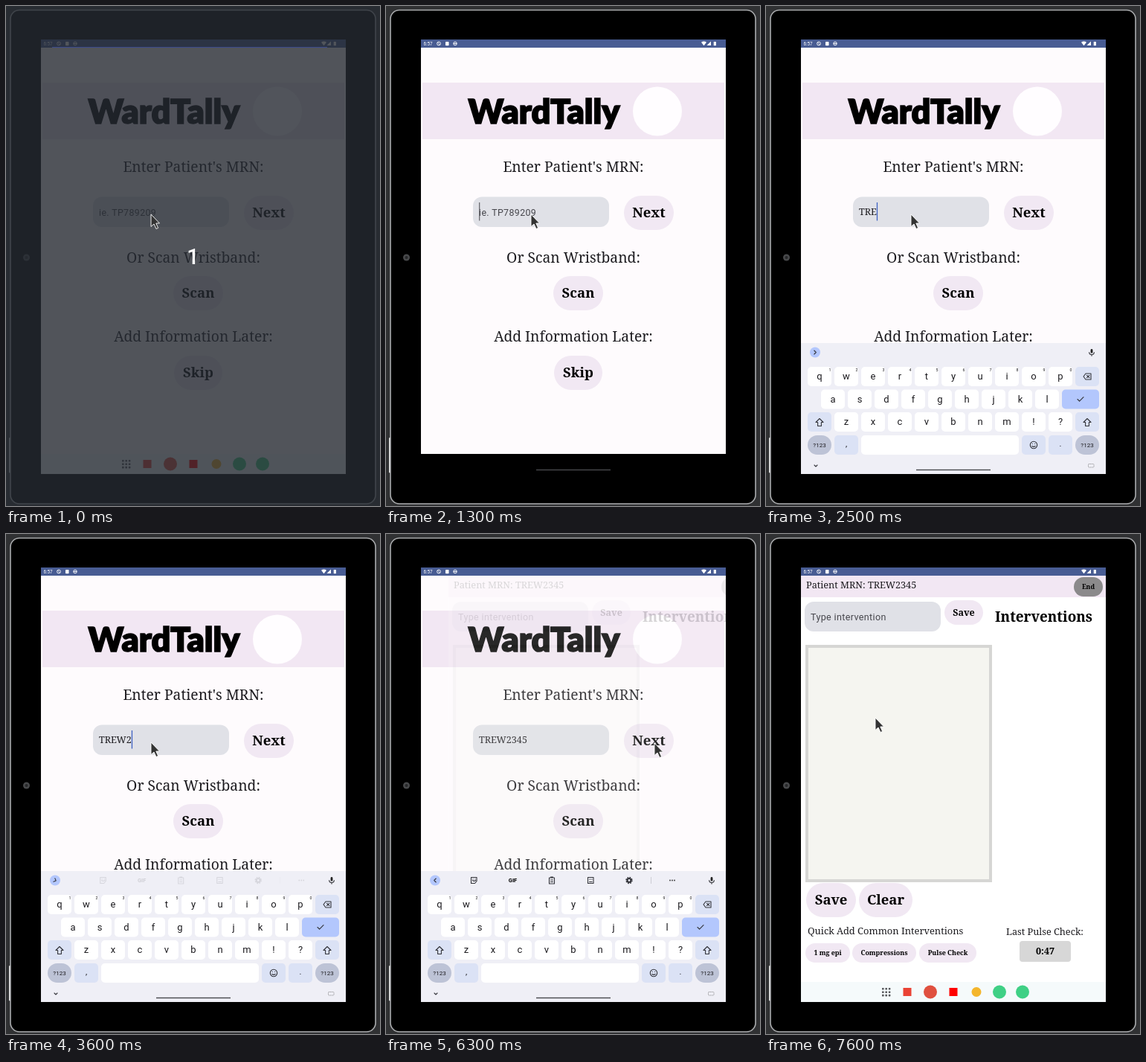
Write an HTML page that moves like this. It is 503 px wide and 672 px high and loops after 8 s.

```html
<!DOCTYPE html>
<html lang="en">
<head>
<meta charset="utf-8">
<title>Patient charting demo</title>
<style>
html, body { margin: 0; width: 100%; height: 100%; overflow: hidden; background: #303133; }
svg { display: block; width: 503px; height: 672px; }
text { font-family: "Noto Serif", serif; fill: #1c1b1f; }
.sans { font-family: Roboto, sans-serif; }
.hint { letter-spacing: .03em; fill: #46464c; }
.title { font-family: Lato, sans-serif; font-weight: 900; fill: #000; stroke: #000; stroke-width: 1.6; }
.bold { font-weight: 700; fill: #000; }
.line { fill: none; stroke: #33343a; stroke-width: 1.1; stroke-linecap: round; stroke-linejoin: round; }
</style>
</head>
<body>
<svg id="stage" viewBox="0 0 503 672"></svg>
<script>
const LILAC = '#f1e8f3', FIELD = '#e0e1e7', KEY = '#dbe2f5', ACCENT = '#b3c7fd', MOD = '#bdc3d6';

const rect = (x, y, w, h, fill, r = 0, extra = '') =>
  `<rect x="${x}" y="${y}" width="${w}" height="${h}" rx="${r}" fill="${fill}" ${extra}/>`;
const circle = (x, y, r, fill, extra = '') => `<circle cx="${x}" cy="${y}" r="${r}" fill="${fill}" ${extra}/>`;
const text = (s, x, y, size, cls = '', anchor = 'start', extra = '') =>
  `<text x="${x}" y="${y}" font-size="${size}" class="${cls}" text-anchor="${anchor}" ${extra}>${s}</text>`;
const mid = (s, x, y, size, cls = '') => text(s, x, y, size, cls, 'middle');
const line = (d, extra = '') => `<path class="line" d="${d}" ${extra}/>`;
const group = (id, body) => `<g id="${id}">${body}</g>`;
const pill = (s, x, y, w, h, size, fill = LILAC) =>
  rect(x, y, w, h, fill, h / 2) + mid(s, x + w / 2, y + h / 2 + size * .34, size, 'bold');

function tablet() {
  return rect(0, 0, 503, 672, '#303133') +
    rect(4, 580, 3, 47.5, '#eee', 1.2) +
    rect(6, 5.5, 491, 663.5, '#000', 12, 'stroke="#a9abad" stroke-width="1.6"') +
    circle(27.5, 338, 4.5, '#48494b') + circle(27.5, 338, 2, '#27282a');
}

function statusBar() {
  const white = 'fill="none" stroke="#fff" stroke-width=".9"';
  return rect(47, 45, 410, 11, '#485c93') +
    text('6:57', 50.5, 53, 6.3, 'sans', 'start', 'style="fill:#fff"') +
    circle(71, 50.5, 2.4, 'none', white) + `<path d="M69.5 49l3 3" ${white}/>` +
    rect(80, 48, 4.5, 5.2, '#fff', .8) + circle(93, 50.5, 2.3, 'none', white) + rect(91, 50, 4, 1, '#fff') +
    '<path d="M424 48.8q3.5-2.4 7 0l-3.5 4.4zM437 47.5v5.5h-5.5z" fill="#fff"/>' +
    rect(440.7, 48, 3.2, 5.2, '#fff', .5);
}

function homePage() {
  return rect(47, 56, 410, 546, '#fefbfd') + rect(49, 103, 406, 76, '#f2e7f3') +
    mid('WardTally', 212.5, 157.5, 45, 'title') + circle(365, 141.5, 33, '#fffdff') +
    mid("Enter Patient's MRN:", 252, 223, 19.25) + rect(117, 256.5, 183, 40.5, FIELD, 12) +
    pill('Next', 320, 255, 67, 46, 18.5) +
    mid('Or Scan Wristband:', 252, 344.5, 19.25) + pill('Scan', 225, 363, 67, 46, 18.5) +
    mid('Add Information Later:', 252, 451, 19.25) + pill('Skip', 226, 470, 65, 46, 18.5) +
    text('ie. TP789209', 125, 282, 12.4, 'sans hint', 'start', 'id="hint"') +
    text('', 125, 281, 12.6, '', 'start', 'id="typed"') +
    rect(125, 264, 1.3, 24.5, '#4a62b8', 0, 'id="caret"');
}

function chartPage() {
  return rect(47, 56, 410, 546, '#fff') + rect(47, 56, 410, 29, '#f2e7f3') +
    text('Patient MRN: TREW2345', 54, 73, 12.7) + pill('End', 414, 58, 39, 26, 8.7, '#8b8a8b') +
    rect(52, 91, 183, 40, FIELD, 12) +
    text('Type intervention', 60, 116, 12.5, 'sans hint') +
    pill('Save', 240, 89, 52, 33, 12.5) + text('Interventions', 308, 118, 18.9, 'bold') +
    rect(55, 151, 247, 315, '#f5f5f0', 0, 'stroke="#d6d6d4" stroke-width="4"') +
    pill('Save', 54, 469, 67, 46, 18.5) + pill('Clear', 125, 469, 72, 46, 18.5) +
    text('Quick Add Common Interventions', 56, 538, 12.9) +
    pill('1 mg epi', 53, 550, 60, 26, 8.9) + pill('Compressions', 116, 550, 86, 26, 8.9) +
    pill('Pulse Check', 206, 550, 77, 26, 8.9) +
    mid('Last Pulse Check:', 375, 539, 12.7) + rect(341, 547, 69, 28, '#d7d7d7', 4) +
    mid('0:47', 375.5, 565, 12.6, 'bold');
}

function dock() {
  let s = rect(47, 602, 410, 27, '#f5fafb');
  for (let i = 0; i < 9; i++) s += rect(156 + i % 3 * 4.4, 610 + (i / 3 | 0) * 4.4, 2.6, 2.6, '#55565a', .7);
  return s + rect(184.5, 610, 11, 11, '#ea4335') + circle(221, 615.5, 9, '#e0503f') +
    rect(246.5, 610, 11, 11, '#f00') + circle(283, 615.5, 6.5, '#f4b62c') +
    circle(314, 615.5, 9, '#3fd085') + circle(345, 615.5, 9, '#3fd085');
}

function keyboard() {
  const key = (x, y, w, fill = '#fff', r = 5) => rect(x, y, w, 26, fill, r);
  const row = (chars, x, y) => [...chars].map((c, i) =>
    key(x + 36 * i, y, 32) + mid(c, x + 16 + 36 * i, y + 17, 13, 'sans')).join('');
  const shift = x => key(x - 16, 546, 32, KEY) +
    line(`M${x} 554.5l5 5h-2.6v5h-4.8v-5h-2.6z`, 'data-shift');
  let s = rect(47, 453, 410, 176, '#efeff6') +
    row('qwertyuiop', 56, 485) + row('asdfghjkl', 74, 515.5) + row('zxcvbnm!?', 92, 546);
  for (let i = 0; i < 10; i++) s += mid((i + 1) % 10, 86 + 36 * i, 491, 5.2, 'sans');
  s += key(416, 485, 32, KEY) + line('M427 498l3-4h7v8h-7zM431.5 496.3l3.4 3.4m0-3.4l-3.4 3.4') +
    key(398, 515.5, 50, ACCENT) + line('M419 528.5l2.6 2.6 5.4-5.4') + shift(72) + shift(432);
  for (const x of [56, 416]) s += key(x, 577, 32, MOD, 13) + mid('?123', x + 16, 593, 8, 'sans');
  s += key(92, 577, 32, KEY) + mid(',', 108, 592, 11, 'sans') + key(128, 577, 212) +
    key(344, 577, 32, KEY) + circle(360, 590, 4.7, 'none', 'class="line"') +
    line('M357.8 591.4q2.2 2 4.4 0M358.3 588.4v.1M361.7 588.4v.1') +
    key(380, 577, 32, KEY) + mid('.', 396, 592, 11, 'sans') +
    line('M65 617l2 2 2-2') + rect(433.5, 615.5, 7.5, 4.5, 'none', .8, 'stroke="#777" stroke-width=".8" stroke-dasharray="1 .8"') +
    circle(66, 465.5, 7, ACCENT) + line('M-1.2-2.5l2.5 2.5-2.5 2.5', 'id="arrow"') +
    rect(436.6, 461, 2.8, 5.6, '#222', 1.4) + line('M434.7 465.5q0 3 3.3 3t3.3-3M438 468.5v1.8');
  const tools = line('M114.5 461.5h7.5v5l-2.5 3h-5zM116.5 465.5q2 2 4 0M117 463.6v.1M120 463.6v.1') +
    mid('GIF', 170.5, 468.3, 7.5, 'sans bold') +
    line('M219.5 462h7v8h-7zM221.5 461h3M221.5 465h3M221.5 467.5h3') +
    line('M271.5 461.5h7.5v8h-7.5zM273.5 464h.2M275.2 464h.2M277 464h.2M273.5 467.5h3.6') +
    circle(327, 465.5, 2.5, 'none', 'stroke="#33343a" stroke-width="2.2"') +
    circle(327, 465.5, 4, 'none', 'stroke="#33343a" stroke-width="1.4" stroke-dasharray="1.8 1.34"') +
    rect(356, 461, 1, 9, '#cccdd4') +
    [382, 385, 388].map(x => circle(x, 465.5, .9, '#333')).join('');
  return s + group('tools', tools);
}

const stage = document.getElementById('stage');
stage.innerHTML = '<clipPath id="screen"><rect x="47" y="45" width="410" height="584"/></clipPath>' +
  tablet() + '<g clip-path="url(#screen)">' + homePage() + group('chart', chartPage()) +
  rect(47, 602, 410, 27, '#000') + group('keys', keyboard()) +
  rect(202, 622.8, 100, 1.4, '#48494d') + group('dock', dock()) + statusBar() + '</g>' +
  group('dim', rect(0, 0, 503, 672, 'rgba(38,43,50,.8)') + rect(62, 55, 370, 1, '#3c4b8c') +
    text('1', 251.5, 347, 29, 'sans', 'middle', 'style="fill:#fff" font-weight="500"')) +
  '<path id="cursor" d="M0 0V16.5L4 13 7 19.5 9.6 18.3 6.8 12H11.5Z" fill="#333" stroke="#fff" stroke-width=".9"/>';

const $ = id => document.getElementById(id);
const show = (id, on) => $(id).style.display = on ? '' : 'none';
const move = (id, x, y) => $(id).setAttribute('transform', `translate(${x} ${y})`);
const ease = (t, a, b) => {
  const p = Math.min(1, Math.max(0, (t - a) / (b - a)));
  return p * p * (3 - 2 * p);
};

const keyTimes = [2000, 2200, 2500, 2800, 3500, 3700, 4000, 4300];
const mrn = 'TREW2345';
const path = [[4700, 195, 280], [4800, 203, 277], [5300, 361, 281], [7000, 361, 281], [7600, 147, 247]];

function cursorAt(t) {
  let [, x, y] = path[0];
  for (let i = 1; i < path.length; i++) {
    const p = ease(t, path[i - 1][0], path[i][0]);
    x += (path[i][1] - path[i - 1][1]) * p;
    y += (path[i][2] - path[i - 1][2]) * p;
  }
  return [x, y];
}

function draw(t) {
  show('dim', t < 100);
  show('dock', t < 1300 || t >= 7500);

  const count = keyTimes.filter(k => t >= k).length;
  $('typed').textContent = mrn.slice(0, count);
  show('hint', !count);
  show('caret', t >= 900 && t < 4800 && !(t >= 3300 && t < 3500));
  $('caret').setAttribute('x', count ? 125 + $('typed').getComputedTextLength() : 125);
  $('caret').setAttribute('fill', count ? '#3f62c4' : '#6a6a70');

  const up = ease(t, 1300, 1800) - ease(t, 7000, 7500);
  show('keys', up > 0);
  move('keys', 0, 176 * (1 - up));
  const held = t >= 2600 && t < 3000;
  document.querySelectorAll('[data-shift]').forEach(e => e.style.fill = held ? '#33343a' : 'none');

  const open = ease(t, 3400, 4300);
  $('tools').style.opacity = open;
  move('tools', 14 * (1 - open), 0);
  $('arrow').setAttribute('transform', `translate(66 465.5) rotate(${180 * open})`);

  $('chart').style.opacity = ease(t, 6200, 6600);
  move('chart', 40 * (1 - ease(t, 6200, 6800)), 0);
  move('cursor', ...cursorAt(t));
}

const start = performance.now();
function tick() {
  draw(Math.floor((performance.now() - start) % 8000 / 100) * 100);
  requestAnimationFrame(tick);
}
tick();
</script>
</body>
</html>
```
